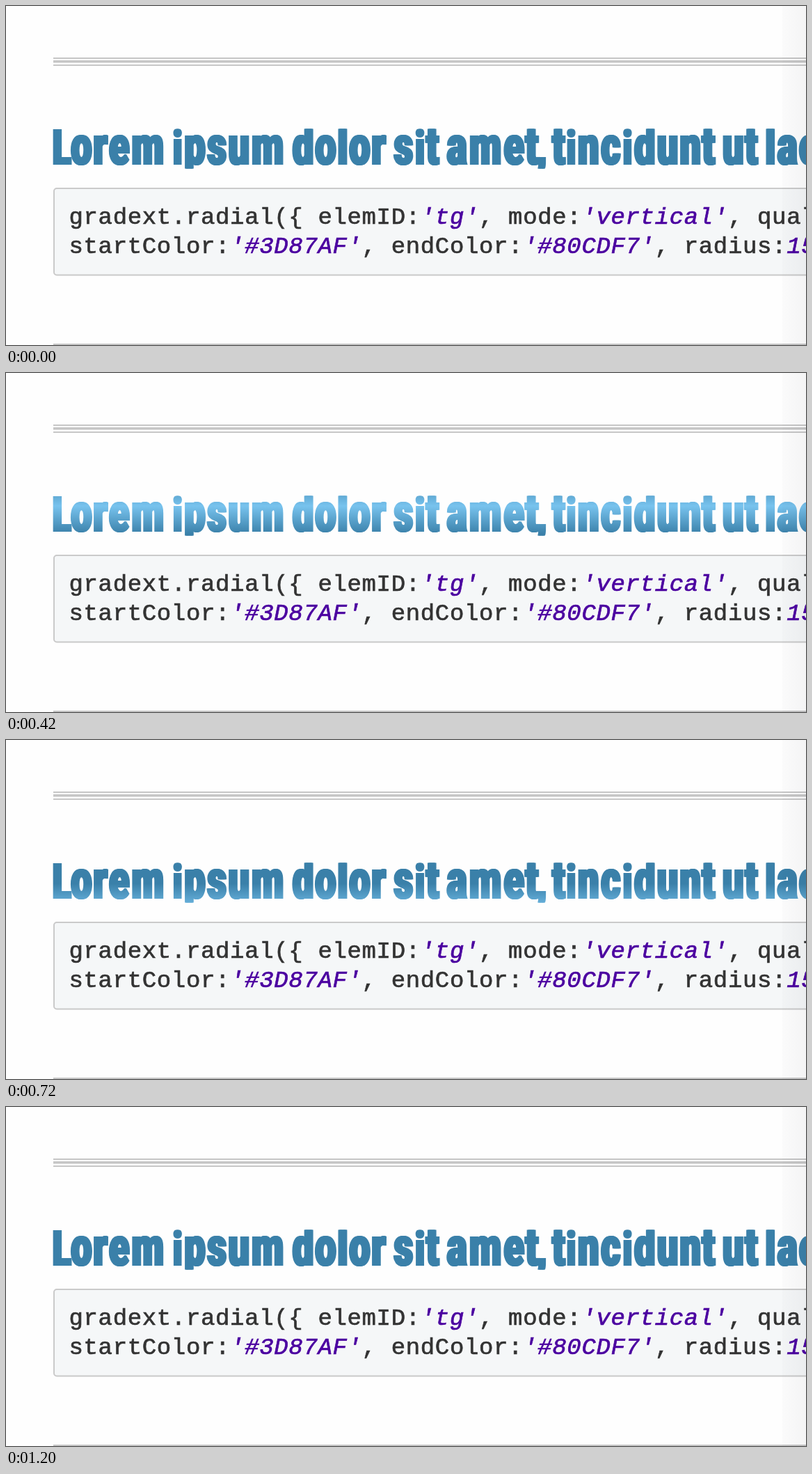
Recreate the animation shown at these times as an HTML page. Size 1150x487 px, loop 1.26 s.

```html
<!DOCTYPE html>
<html lang="en">
<head>
<meta charset="utf-8">
<title>Text gradient</title>
<style>
  html, body { margin: 0; width: 100%; height: 100%; overflow: hidden; background: #fefefe; }
  svg { display: block; width: 1150px; height: 487px; }
  .rule { fill: #c6c6c6; }
  .head { font-family: Roboto, 'Open Sans', sans-serif; font-weight: 900; text-anchor: middle;
          fill: url(#band); stroke: url(#band); stroke-width: 2; stroke-linejoin: miter; }
  .code { font: 34px 'Courier New', 'Liberation Mono', monospace; letter-spacing: .65px; white-space: pre;
          fill: #333; stroke: #333; stroke-width: .7; }
  .code .val { font-style: italic; fill: #4b00a0; stroke: #4b00a0; }
</style>
</head>
<body>
<svg viewBox="0 0 1150 487">
  <defs>
    <linearGradient id="band" gradientUnits="userSpaceOnUse" x1="0" x2="0">
      <stop offset="0" stop-color="#3a80a9"/>
      <stop offset=".5" stop-color="#78c3ee"/>
      <stop offset="1" stop-color="#3a80a9"/>
    </linearGradient>
    <linearGradient id="edge">
      <stop offset="0" stop-color="#223" stop-opacity=".015"/>
      <stop offset="1" stop-color="#223" stop-opacity=".045"/>
    </linearGradient>
    <clipPath id="crop"><rect x="0" y="176.5" width="1150" height="57"/></clipPath>
  </defs>
  <rect class="rule" x="68" y="74" width="1082" height="2"/>
  <rect class="rule" x="68" y="78" width="1082" height="3.5"/>
  <rect class="rule" x="68" y="84" width="1082" height="2"/>
  <rect class="rule" x="68" y="485" width="1082" height="2"/>
  <!-- sideways copies thicken the stems only -->
  <g clip-path="url(#crop)">
    <text id="head" class="head" transform="scale(.7 1)"></text>
    <use href="#head" x="-1.3"/>
    <use href="#head" x="1.3"/>
  </g>
  <rect x="69" y="262" width="1100" height="124.5" rx="4" fill="#f5f7f8" stroke="#cacaca" stroke-width="2"/>
  <text class="code" x="90.5" y="313">gradext.radial({ elemID:<tspan class="val">'tg'</tspan>, mode:<tspan class="val">'vertical'</tspan>, qual</text>
  <text class="code" x="90.5" y="355">startColor:<tspan class="val">'#3D87AF'</tspan>, endColor:<tspan class="val">'#80CDF7'</tspan>, radius:<tspan class="val">15</tspan></text>
  <rect x="1116" y="0" width="34" height="487" fill="url(#edge)"/>
</svg>
<script>
const LOOP = 1260, STEP = 60, REACH = 40;
const head = document.getElementById('head');
const band = document.getElementById('band');

// Letter advances in em, for a tight poster face
const advance = {
  L: .409, a: .526, c: .519, d: .54, e: .53, i: .291, l: .291, m: .81, n: .54,
  o: .53, p: .54, r: .374, s: .506, t: .33, u: .54, ',': .178, ' ': .176
};
const sizes = { L: 69, i: 67 };

function setHeading(text) {
  let x = 68;
  for (const ch of text) {
    const w = advance[ch] * 64 - 1.8;
    const span = document.createElementNS('http://www.w3.org/2000/svg', 'tspan');
    span.textContent = ch;
    span.setAttribute('x', (x + w / 2) / .7);
    span.setAttribute('y', 227);
    span.setAttribute('font-size', sizes[ch] || 76);
    head.appendChild(span);
    x += w;
  }
}

function draw(ms) {
  const t = Math.floor(ms % LOOP / STEP) * STEP;
  const y = 191 + (t - 420) * .185;
  band.setAttribute('y1', y - REACH);
  band.setAttribute('y2', y + REACH);
}

setHeading('Lorem ipsum dolor sit amet, tincidunt ut lao');
draw(0);
const start = performance.now();
function tick() {
  draw(performance.now() - start);
  requestAnimationFrame(tick);
}
requestAnimationFrame(tick);
</script>
</body>
</html>
```
